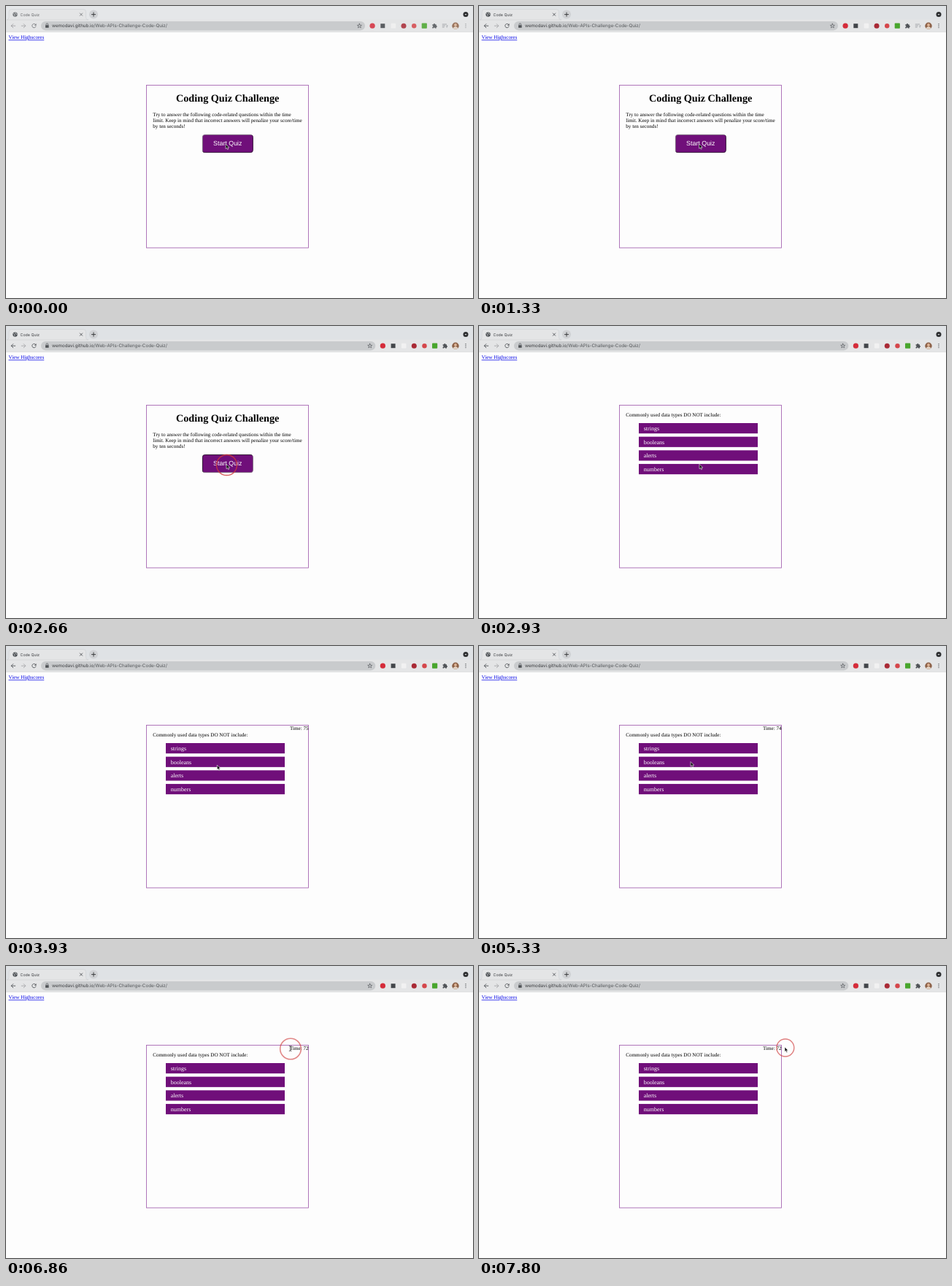
An HTML page for the animation above (8000 ms loop, 640 by 400 pixels).

```html
<!DOCTYPE html>
<html lang="en">
<head>
<meta charset="utf-8">
<title>Code Quiz</title>
<style>
  html, body { margin: 0; width: 100%; height: 100%; overflow: hidden; background: #fdfdfd; }
  svg { display: block; width: 100%; height: 100%; }
  text { font: 7.11px "Liberation Serif", serif; text-rendering: geometricPrecision; white-space: pre; }
  .ui { font: 6.22px Inter, sans-serif; fill: #3a3c3f; }
  .line { fill: none; stroke: #505357; stroke-width: .9; stroke-linecap: round; stroke-linejoin: round; }
  .answer { font-size: 8px; fill: #fff; }
</style>
</head>
<body>
<svg viewBox="0 0 640 400">
  <rect width="640" height="400" fill="#fdfdfd"/>

  <g id="browser">
    <rect id="strip" width="640" height="19" fill="#dfe2e5"/>
    <rect id="toolbar" y="18.5" width="640" height="17.2" fill="#e4e5e6"/>
    <path id="tab" d="M1 19Q4 19 4 15.5V8Q4 4.5 7.500 4.500H106Q109.500 4.500 109.500 8V15.500Q109.500 19 113 19Z" fill="#e4e5e6" stroke="#c9cbce" stroke-width=".5"/>
    <path d="M0 35.600H640" stroke="#d2d3d5" stroke-width=".5"/>
    <g id="tabLabel">
      <circle cx="12.500" cy="11.600" r="3.200" fill="#4b4f53"/>
      <path d="M10.500 10.500L12 11.500L11.800 13.500M13 9.300L13.200 10.600L15 11.400" class="line" style="stroke:#e4e5e6;stroke-width:.7"/>
      <text class="ui" x="19.500" y="13.600" style="font-size:5.330px">Code Quiz</text>
      <path class="line" d="M101.300 9.900l3.400 3.400m0-3.400l-3.400 3.400"/>
    </g>
    <circle cx="120" cy="11.600" r="6" fill="#cfd1d4"/>
    <path class="line" d="M117.400 11.600h5.200m-2.600-2.600v5.200" style="stroke:#303234"/>
    <circle cx="630" cy="11.600" r="3.500" fill="#2d2f31"/>
    <path d="M628.500 11l1.500 1.600 1.500-1.600z" fill="#eee"/>

    <rect id="pill" x="48" y="21" width="444" height="12.400" rx="6.200" fill="#c9cbcd"/>
    <path id="back" class="line" d="M12.700 27.200H7.300m2.500-2.600l-2.600 2.600 2.600 2.600"/>
    <path class="line" d="M21.300 27.200h5.400m-2.500-2.600l2.600 2.600-2.600 2.600" style="stroke:#a6a8aa"/>
    <g id="reload">
      <path class="line" d="M40.600 25.400A2.700 2.700 0 1 0 41 28"/>
      <path d="M41.500 24v2.700h-2.700z" fill="#505357"/>
    </g>
    <path class="line" d="M55 26.300v-1.200a1.300 1.300 0 0 1 2.600 0v1.200" style="stroke-width:.7"/>
    <rect x="54" y="26.200" width="4.600" height="3.600" rx=".5" fill="#505357"/>
    <text class="ui" x="63" y="29.400">wemodavi.github.io<tspan fill="#54575a">/Web-APIs-Challenge-Code-Quiz/</tspan></text>
    <path id="star" class="line" style="stroke-width:.65" d="M0-3L.85-.95 3-.85 1.300.5 1.900 2.600 0 1.400-1.900 2.600-1.300.5-3-.85-.85-.95Z"/>

    <g id="extensions">
      <circle cx="502.100" cy="27.200" r="3.600" fill="#d52c3a"/>
      <rect x="513.300" y="24.200" width="6" height="6" fill="#43464a"/>
      <rect x="527.600" y="23.800" width="6.600" height="6.800" rx="1" fill="#f1f1f1"/>
      <circle cx="545" cy="27.200" r="3.500" fill="#a92a35"/>
      <circle cx="559.200" cy="27.200" r="3.200" fill="#d5474b"/>
      <rect x="569.700" y="23.600" width="7.200" height="7.200" rx=".8" fill="#49a62d"/>
      <path fill="#505357" d="M584.300 25.200h1.600a1.100 1.100 0 1 1 2.200 0h1.600v1.700a1.100 1.100 0 1 1 0 2.200v1.500h-1.900a1 1 0 0 0-2 0h-1.500v-1.800a1 1 0 0 0 0-2z"/>
    </g>
    <path id="media" class="line" style="stroke:#a0a2a5" d="M598.200 25h5.400m-5.400 2h3.300m-3.300 2h2.200m3.800-2v2.200m0-2.200h1"/>
    <g id="profile">
      <circle cx="616" cy="27.200" r="4.700" fill="#8d6248"/>
      <circle cx="616" cy="26" r="1.900" fill="#dfb596"/>
      <path d="M612.500 30.200q3.500-3.800 7 0q-3.500 3.200-7 0z" fill="#e6d8ca"/>
    </g>
    <g id="menu" fill="#505357">
      <circle cx="630" cy="24.800" r=".7"/><circle cx="630" cy="27.200" r=".7"/><circle cx="630" cy="29.600" r=".7"/>
    </g>
  </g>

  <text x="3.500" y="45.400" fill="#0000e8" text-decoration="underline">View Highscores</text>
  <rect x="192.500" y="108.500" width="222" height="222.700" fill="none" stroke="#a768b3" stroke-width=".9"/>

  <g id="intro">
    <text x="303.700" y="131.300" text-anchor="middle" style="font-size:14.220px;font-weight:bold">Coding Quiz Challenge</text>
    <text x="201.300" y="150.800">Try to answer the following code-related questions within the time</text>
    <text x="201.300" y="158.800">limit. Keep in mind that incorrect answers will penalize your score/time</text>
    <text x="201.300" y="166.800">by ten seconds!</text>
    <rect x="269.400" y="176.400" width="69" height="24.200" rx="3.200" fill="#700f7a"/>
    <path id="edgeLight" class="line" d="M270 199.800Q269.400 199 269.400 197.400V179.600Q269.400 176.400 272.600 176.400H335.200Q337 176.400 337.600 177.300"/>
    <path id="edgeDark" class="line" d="M337.600 177.300Q338.400 178 338.400 179.600V197.400Q338.400 200.600 335.200 200.600H272.600Q270.700 200.600 270 199.800"/>
    <text x="303.800" y="191.100" text-anchor="middle" fill="#fff" style="font:8.890px 'Liberation Sans',sans-serif">Start Quiz</text>
  </g>

  <g id="quiz">
    <text x="201.300" y="124">Commonly used data types DO NOT include:</text>
    <text id="timer" x="414.600" y="115.300" text-anchor="end"></text>
    <g id="answers"></g>
  </g>

  <circle id="ring" fill="none" stroke="#cf3b3b"/>
  <path id="arrow" d="M0 0V6.400L1.500 5.100 2.500 7.400 3.700 6.900 2.700 4.700H4.700Z" fill="#111" stroke="#fff" stroke-width=".55"/>
  <path id="beam" class="line" style="stroke:#222;stroke-width:.7" d="M-1.300-3.500Q0-3.500 0-2.700Q0-3.500 1.300-3.500M0-2.700V2.700M-1.300 3.500Q0 3.500 0 2.700Q0 3.500 1.300 3.500"/>
</svg>
<script>
const $ = id => document.getElementById(id);
const show = (id, on) => $(id).setAttribute('visibility', on ? 'visible' : 'hidden');
const move = (id, x, y) => $(id).setAttribute('transform', `translate(${x} ${y})`);
const set = (id, attrs) => { for (const k in attrs) $(id).setAttribute(k, attrs[k]); };

const LOOP = 8000;
const steps = [0, 200, 430, 660, 930, 1130, 1330, 1600, 1860, 2130, 2400, 2660, 2930, 3130, 3330,
  3600, 3930, 4130, 4400, 4600, 4860, 5060, 5330, 5800, 6260, 6530, 6860, 7130, 7460, 7800];

// time, x, y
const path = [[0, 301, 189.2], [1330, 301.6, 188.8], [2660, 302, 189.3], [2930, 302, 189.3],
  [3930, 289.3, 163], [5330, 290, 158.5], [6860, 389.6, 113], [7130, 389.6, 113],
  [7800, 419, 111], [LOOP, 419, 111]];

const clicks = [
  { from: 2660, to: 2930, cx: 302.5, cy: 190.5, r: 14, width: 1.4, opacity: .8 },
  { from: 6860, to: 7130, cx: 390, cy: 113.5, r: 14.3, width: 1.6, opacity: .6 },
  { from: 7800, to: LOOP, cx: 419.8, cy: 112, r: 12, width: 1.4, opacity: .65 }
];

$('answers').innerHTML = ['strings', 'booleans', 'alerts', 'numbers'].map((label, i) => {
  const y = 133 + i * 18.65;
  return `<rect x="219" y="${y}" width="163" height="14.2" fill="#700f7a"/>
    <text class="answer" x="225.700" y="${y + 9.9}">${label}</text>`;
}).join('');

function cursorAt(t) {
  const i = path.findIndex(p => p[0] > t);
  const [t0, x0, y0] = path[i - 1], [t1, x1, y1] = path[i];
  const u = (t - t0) / (t1 - t0), e = u * u * (3 - 2 * u);
  return [x0 + (x1 - x0) * e, y0 + (y1 - y0) * e];
}

function drawBrowser(t) {
  const focused = t >= 200, wide = t >= 2400, shift = wide ? 14.3 : 0;
  $('strip').setAttribute('fill', focused ? '#dfe2e5' : '#e5e7e9');
  for (const id of ['tabLabel', 'reload', 'extensions', 'profile', 'menu'])
    $(id).setAttribute('opacity', focused ? 1 : id === 'extensions' || id === 'profile' ? .85 : .75);
  $('back').setAttribute('opacity', focused ? 1 : .45);
  $('menu').setAttribute('opacity', focused ? 1 : .5);
  $('pill').setAttribute('width', 444 + shift);
  move('star', 484.4 + shift, 27.2);
  move('extensions', shift, 0);
  show('media', !wide);
}

function draw(t) {
  drawBrowser(t);
  const started = t >= 2930, pressed = t >= 2660;
  show('intro', !started);
  show('quiz', started);
  $('edgeLight').style.stroke = pressed ? '#1d0820' : '#76667a';
  $('edgeDark').style.stroke = pressed ? '#76667a' : '#2b102f';
  const ticks = Math.floor((t - 3850) / 1000);
  $('timer').textContent = ticks < 0 ? '' : 'Time: ' + (75 - ticks);

  const click = clicks.find(c => t >= c.from && t < c.to);
  show('ring', click);
  if (click) set('ring', { cx: click.cx, cy: click.cy, r: click.r, 'stroke-width': click.width, opacity: click.opacity });

  const [x, y] = cursorAt(t);
  const overTimer = started && x > 388 && x < 415 && y > 108 && y < 118;
  show('arrow', !overTimer);
  show('beam', overTimer);
  move(overTimer ? 'beam' : 'arrow', x, y);
}

function frame() {
  const t = performance.now() % LOOP;
  draw(steps.findLast(s => s <= t));
  requestAnimationFrame(frame);
}
frame();
</script>
</body>
</html>
```
